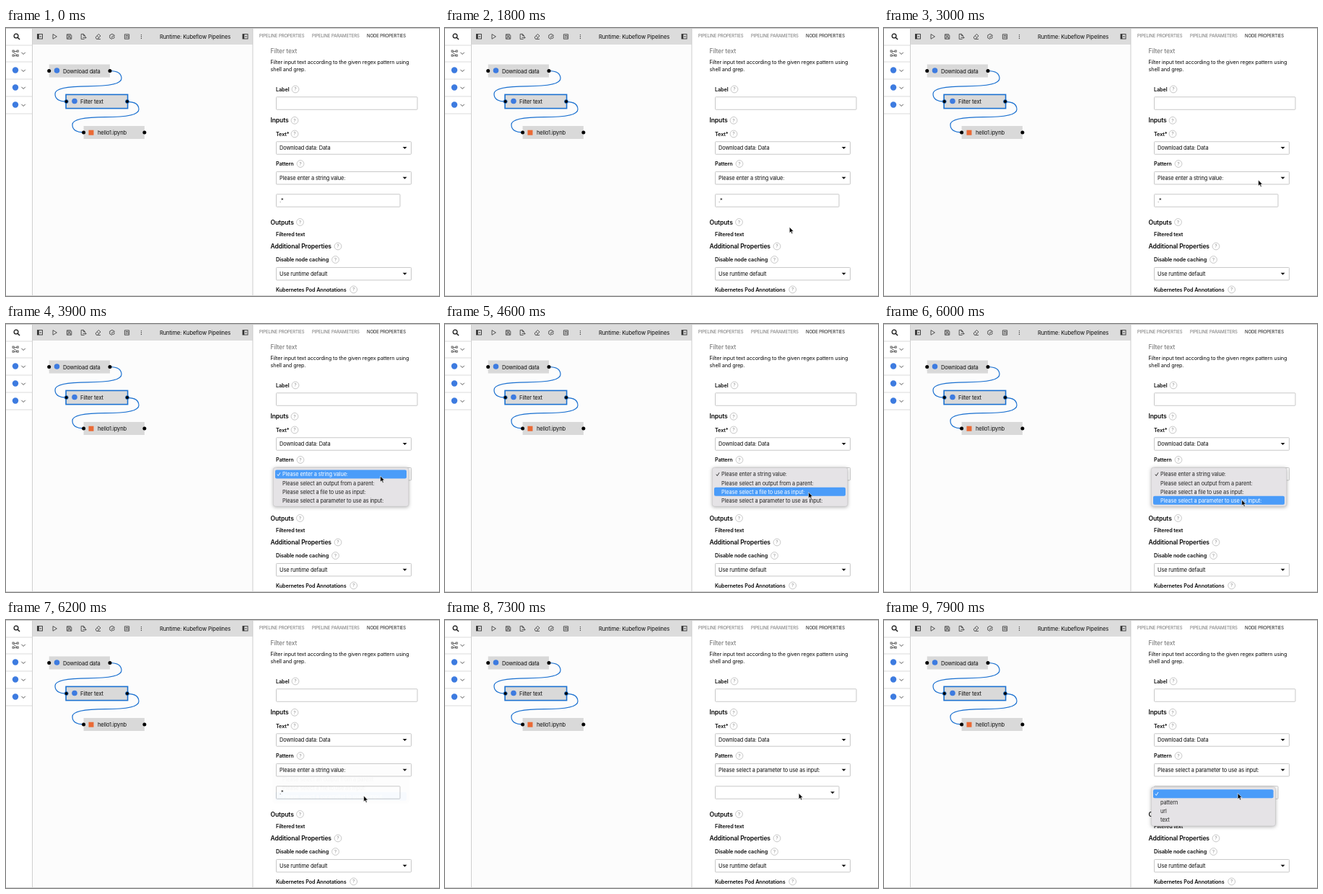
Write an HTML page that moves like this. It is 600x372 px and loops after 8 s.

```html
<!DOCTYPE html>
<html lang="en">
<head>
<meta charset="utf-8">
<title>Node properties</title>
<style>
  html, body { margin: 0; width: 100%; height: 100%; overflow: hidden; background: #fff; }
  svg { display: block; width: 100%; height: 100%; }
  text { font-family: Inter, "Open Sans", sans-serif; letter-spacing: -.016em; white-space: pre; }
  .line { fill: none; stroke: #444; stroke-width: .9; }
</style>
</head>
<body>
<svg id="stage" viewBox="0 0 600 372"></svg>
<script>
const NS = "http://www.w3.org/2000/svg";
const stage = document.getElementById("stage");

function add(tag, attrs, parent = stage) {
  const el = document.createElementNS(NS, tag);
  for (const k in attrs) el.setAttribute(k, attrs[k]);
  parent.appendChild(el);
  return el;
}
const rect = (x, y, width, height, fill, more, parent) =>
  add("rect", { x, y, width, height, fill, ...more }, parent);
const circle = (cx, cy, r, fill, more, parent) =>
  add("circle", { cx, cy, r, fill, ...more }, parent);
const path = (d, more, parent) => add("path", { d, class: "line", ...more }, parent);
function text(str, x, mid, size = 7.4, fill = "#0c0c0c", weight = 400, parent = stage) {
  const el = add("text", { x, y: mid + size * .36, "font-size": size, fill, "font-weight": weight }, parent);
  el.textContent = str;
  return el;
}

// Page areas
rect(0, 0, 600, 372, "#fff");
rect(37, 23, 305, 349, "#fcfcfc");
rect(37, 1, 305, 22, "#dcdcdc");
rect(0, 0, 600, 1, "#c4c4c4");
rect(0, 371, 600, 1, "#d0d0d0");
rect(36, 1, 1, 370, "#cfcfcf");
rect(341.5, 1, .9, 370, "#c8c8c8");

// Palette column
circle(14, 11, 2.9, "none", { stroke: "#111", "stroke-width": 1.2 });
path("M16.2 13.2L19 16", { style: "stroke:#111;stroke-width:1.4" });
for (const y of [24, 47, 71, 95, 119]) rect(0, y - .4, 36.5, .8, "#d2d2d2");
for (const y of [35, 59, 83, 107]) path(`M21.4 ${y - 1.2}l2.7 2.7 2.7-2.7`);
path("M11 32.5h4M10.5 34l4.5 3.5M11 38.5h4", { style: "stroke:#444;stroke-width:.8" });
for (const [x, y] of [[9, 31], [15, 31], [9, 37], [15, 37]])
  rect(x, y, 2.2, 2.2, "#fff", { stroke: "#444", "stroke-width": .8 });
for (const y of [59, 83, 107]) circle(13, y - .5, 4.2, "#3d7be0");

// Toolbar
function panelIcon(x) {
  rect(x - 3.5, 8.6, 7, 6.4, "none", { stroke: "#333", "stroke-width": .9 });
  rect(x - 3.5, 8.6, 2.3, 6.4, "#333");
  path(`M${x + 2.4} 11.8h-2.4m1-1l-1 1 1 1`, { style: "stroke-width:.7" });
}
panelIcon(47);
panelIcon(331.5);
path("M65 8.6L70.4 11.9 65 15.2z");
path("M84.4 8.8h5l1.4 1.4v5h-6.4zM86 8.8v2.2h3V8.8M86 15.2v-2.6h3.2v2.6");
path("M108.6 15.4h-4.4V8.4h3.2l2 2v1.4M107.2 8.4v2.2h2.2M106.5 13.3h4.6m-1.5-1.5l1.5 1.5-1.5 1.5");
path("M124.2 12.8l4.2-4.4 2.6 2.6-4.2 4.4h-1.4zM126.2 10.8l2.6 2.6M127 15.4h4");
path("M150.2 11v-1L147 8.3l-3.2 1.7v3.8l3.2 1.7");
circle(148.4, 12.8, 1.7, "none", { stroke: "#444", "stroke-width": .9 });
path("M164.4 8.8h6.2v6.4h-6.2zM165.8 10.6h3.6M165.8 12h1.6M165.8 13.4h1.6M169 11.2v3");
for (const y of [9.6, 12, 14.4]) circle(187.5, y, .65, "#333");
text("Runtime: Kubeflow Pipelines", 213, 12, 7.57);

// Flow canvas
const BLUE = "#1a70d0";
const link = "M144 59.5Q160 59.5 160 70.1Q160 80.8 114 80.8Q68 80.8 68 91.4Q68 102 84 102";
const linkStyle = `stroke:${BLUE};stroke-width:1.2`;
path(link, { style: linkStyle });
path(link, { style: linkStyle, transform: "translate(24 42.8)" });

function node(label, x, y, selected) {
  const pad = selected ? .6 : 0;
  rect(x - pad, y - 9 - pad, 84.3 + 2 * pad, 18 + 2 * pad, "#d9d9d9",
    selected ? { stroke: BLUE, "stroke-width": 1.6 } : {});
  text(label, x + 19.3, y + .3, 7.52);
  for (const px of [x, x + 84.3])
    circle(px, y, 2.5, "#000", selected ? { stroke: BLUE, "stroke-width": .8 } : {});
}
node("Download data", 59.7, 59.5);
node("Filter text", 83.7, 102, true);
node("hello1.ipynb", 107.6, 145);
circle(70.5, 59, 3.8, "#3d7be0");
circle(95, 101.5, 3.8, "#3d7be0");
rect(114.5, 141.7, 7, 7, "#ea6a35");

// Properties panel
const tab = (s, x, fill) => text(s, x, 11.2, 6.02, fill);
tab("PIPELINE PROPERTIES", 351, "#6f6f6f");
tab("PIPELINE PARAMETERS", 424, "#6f6f6f");
tab("NODE PROPERTIES", 500, "#161616");

text("Filter text", 366.5, 31.5, 8.65, "#6f6f6f");
text("Filter input text according to the given regex pattern using", 366.5, 47, 7.27);
text("shell and grep.", 366.5, 57.7, 7.27);

function heading(str, x, y, helpX, big) {
  text(str, x, y, big ? 8.6 : 7.27, "#0c0c0c", 600);
  if (!helpX) return;
  circle(helpX, y, 4.9, "#fff", { stroke: "#b9b9b9", "stroke-width": .8 });
  text("?", helpX, y, 6.6, "#8d8d8d").setAttribute("text-anchor", "middle");
}
heading("Label", 374, 85, 401);
heading("Inputs", 366.5, 128.3, 400, true);
heading("Text*", 374, 147, 400);
heading("Pattern", 374, 188.5, 408);
heading("Outputs", 366.5, 269.5, 407.5, true);
heading("Filtered text", 374, 286.5);
heading("Additional Properties", 366.5, 303, 460, true);
heading("Disable node caching", 374, 321.5, 456.5);
heading("Kubernetes Pod Annotations", 374, 363, 481.7);

const field = (y, w) =>
  rect(374.5, y - 8.75, w, 17.5, "#fff", { stroke: "#c2c2c2", "stroke-width": .9, rx: .8 });
const arrow = (x, y) => path(`M${x - 2.9} ${y - 1.4}h5.8l-2.9 3z`, { style: "fill:#111;stroke:none" });
function select(y, value) {
  field(y, 187);
  arrow(552.6, y);
  return text(value, 379, y + .2);
}
field(104.5, 195.5);
select(166.5, "Download data: Data");
const pattern = select(208.2, "");
select(341.2, "Use runtime default");
field(239.5, 171.5);
const regex = text(".*", 379, 239.8);
const paramArrow = arrow(537, 239.6);

// Popup menus
const options = [
  "Please enter a string value:",
  "Please select an output from a parent:",
  "Please select a file to use as input:",
  "Please select a parameter to use as input:"
];
function menu(y, w, items) {
  const g = add("g", { style: "filter:drop-shadow(0 1.5px 2.5px rgba(0,0,0,.3))" });
  rect(370.3, y, w, 54, "#e5e3e6", { rx: 3.2, stroke: "#bdbdbd", "stroke-width": .5 }, g);
  const bar = rect(373, 0, w - 5.6, 12, "#4a9cf9", { rx: 2 }, g);
  const check = path(`M375.8 ${y + 9.5}l1.5 2 2.7-4.4`, {}, g);
  const rows = items.map((s, i) => text(s, 383, y + 9.6 + 12.05 * i, 7.37, "#222", 400, g));
  return {
    g,
    pick(n) {
      bar.setAttribute("y", y + 3.4 + 12.05 * n);
      bar.style.opacity = n < 0 ? 0 : 1;
      rows.forEach((r, i) => r.setAttribute("fill", i === n ? "#fff" : "#222"));
      check.style.stroke = n === 0 ? "#fff" : "#222";
    }
  };
}
const kinds = menu(199.2, 187.6, options);
const params = menu(231.9, 172.2, ["", "pattern", "url", "text"]);
params.pick(0);

const pointer = add("path", {
  d: "M0 0V8.2L1.9 6.5 3.2 9.4 4.6 8.8 3.3 6H5.8z",
  fill: "#000", stroke: "#fff", "stroke-width": .6
});

// Pointer track: time, x, y
const track = [
  [1500, 468, 346], [1600, 472, 316], [1700, 475.5, 290], [1800, 477.3, 276.3], [2000, 477.3, 273.5],
  [2100, 477.3, 273.5], [2300, 486, 255], [2500, 510, 222], [2700, 518.7, 211],
  [4200, 518.7, 211], [4300, 518, 210.4], [4400, 518, 210.4], [4500, 513, 220], [4600, 503.8, 233.6],
  [4700, 503, 240], [5100, 503, 243.6], [5400, 503, 243.6], [5700, 495.7, 244],
  [6600, 495.7, 244], [7300, 490.2, 240.5]
];
function pointAt(t) {
  const i = track.findIndex(k => k[0] > t);
  if (i < 0) return track[track.length - 1].slice(1);
  const [t0, x0, y0] = track[i - 1], [t1, x1, y1] = track[i];
  const p = (t - t0) / (t1 - t0);
  return [x0 + (x1 - x0) * p, y0 + (y1 - y0) * p];
}

const LOOP = 8000, STEP = 100;
const OPEN = 3700, FLASH = 5900, FADE = 6100, CHOSEN = 6300, PARAMS = 7800;

function draw(t) {
  const shown = t >= track[0][0];
  pointer.style.display = shown ? "" : "none";
  if (shown) {
    const [x, y] = pointAt(t);
    pointer.setAttribute("transform", `translate(${x} ${y})`);
    kinds.pick(t === FLASH ? -1 : Math.floor((y - 202.6) / 12.05));
  }
  kinds.g.style.opacity =
    t < OPEN || t >= CHOSEN ? 0 : t < FADE ? 1 : t === FADE ? .5 : .04;
  params.g.style.opacity = t >= PARAMS ? 1 : 0;
  const chosen = t >= CHOSEN;
  pattern.textContent = options[chosen ? 3 : 0];
  regex.style.opacity = chosen ? 0 : 1;
  paramArrow.style.opacity = chosen ? 1 : 0;
}

const start = performance.now();
function tick() {
  const t = (performance.now() - start) % LOOP;
  draw(Math.floor(t / STEP) * STEP);
  requestAnimationFrame(tick);
}
tick();
</script>
</body>
</html>
```
